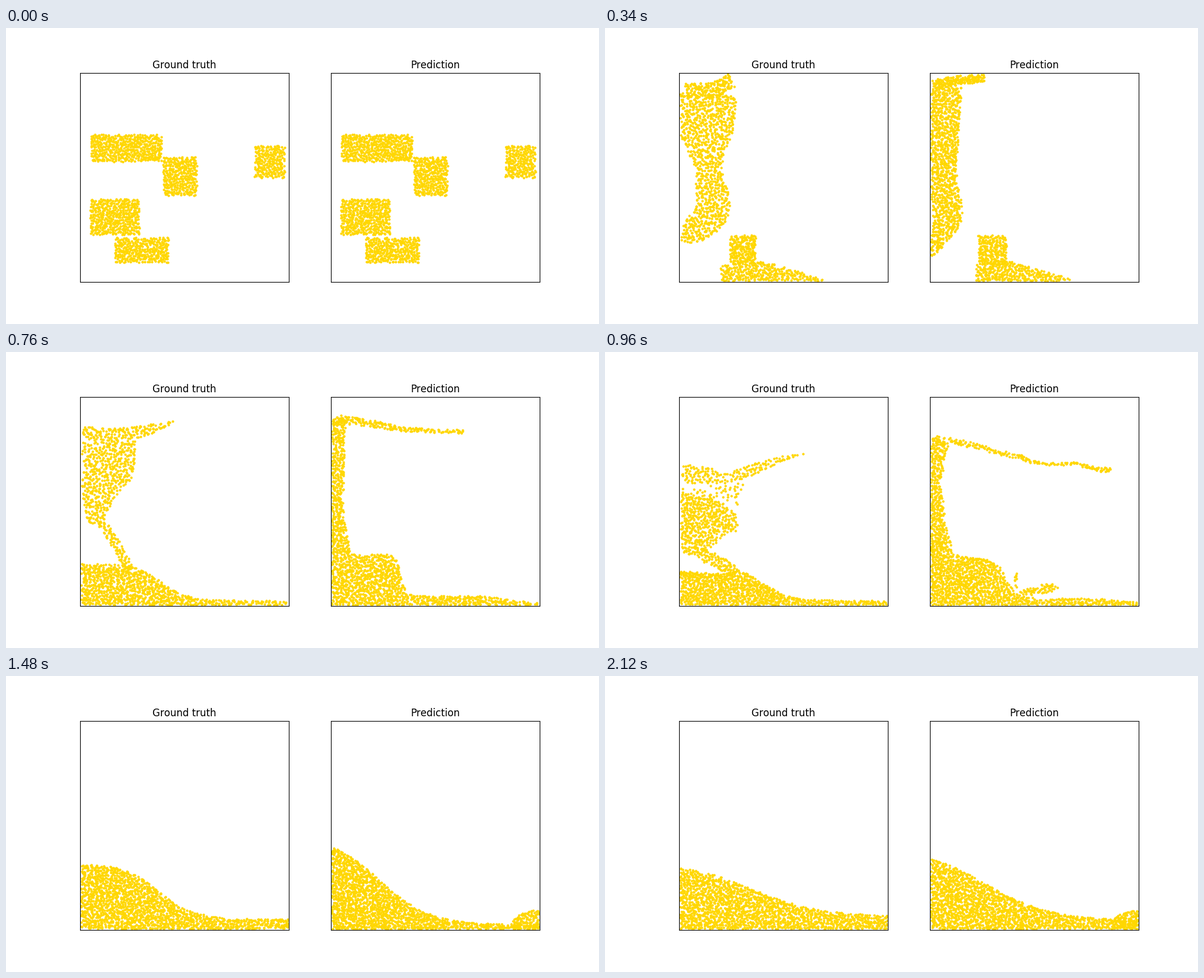
A matplotlib script that plays this animation: 1000x500 px, repeating every 2140 ms.

```python
import numpy as np
import matplotlib.pyplot as plt
from matplotlib.animation import FuncAnimation
from matplotlib.path import Path

plt.rcParams["text.kerning_factor"] = 6
FRAMES, STEP = 107, 20
LEFT, RIGHT, TOP, FLOOR = 126.5, 476, 78, 427.5
TIMES = [0, 4, 9, 17, 26, 38, 58, 74, 106]
N = 1800
CUTS = [180, 1238, 1568]            # crest | bulk | low block | fast block
rng = np.random.default_rng(7)


def spline(t, times, vals):
    """Smooth curve through vals that never overshoots them."""
    times, vals = np.asarray(times), np.asarray(vals, float)
    gaps = np.diff(times).reshape(-1, *[1] * (vals.ndim - 1))
    d = np.diff(vals, axis=0) / gaps
    a, b = d[:-1], d[1:]
    same = a * b > 0
    mid = np.where(same, 2 * a * b / np.where(same, a + b, 1), 0)
    m = np.concatenate([d[:1], mid, d[-1:]])
    k = min(np.searchsorted(times, t, side="right") - 1, len(times) - 2)
    h = times[k + 1] - times[k]
    u = (t - times[k]) / h
    v = 1 - u
    return (vals[k] * (1 + 2 * u) * v * v + m[k] * h * u * v * v
            + vals[k + 1] * u * u * (3 - 2 * u) - m[k + 1] * h * u * u * v)


def rect(x0, y0, x1, y1):
    return np.array([(x0, y0), (x1, y0), (x1, y1), (x0, y1)], float)


def ribbon(*keys):
    """Band along a curve; each key is x, y and width."""
    last = len(keys) - 1
    x, y, w = np.array([spline(u, range(last + 1), keys)
                        for u in np.linspace(0, last, 40)]).T
    dx, dy = np.gradient(x), np.gradient(y)
    side = np.column_stack([-dy, dx]) / (np.hypot(dx, dy)[:, None] + 1e-9)
    mid, side = np.column_stack([x, y]), side * w[:, None] / 2
    band = np.concatenate([mid + side, (mid - side)[::-1]])
    return np.clip(band, [LEFT, TOP], [RIGHT, FLOOR])


def pile(high, low, mid, soft, end=600):
    """Liquid on the floor that slopes from high to low around mid."""
    x = np.linspace(LEFT, min(end, RIGHT), 60)
    h = (high - low) / (1 + np.exp((x - mid) / soft))
    h += low * np.clip((end - x) / 120, .15, 1)
    top = np.column_stack([x, FLOOR - h])
    return np.concatenate([top, [(x[-1], FLOOR), (LEFT, FLOOR)]])


def area(outline):
    x, y = outline.T
    return abs(x @ np.roll(y, 1) - y @ np.roll(x, 1)) / 2


def fill(n, outline, jitter=.45):
    """Scatter n points from a shaken grid inside an outline."""
    lo, hi = outline.min(0), outline.max(0)
    path = Path(outline)
    s = 1.12 * np.sqrt(area(outline) / max(n, 1))
    while True:
        gx, gy = np.meshgrid(np.arange(lo[0], hi[0] + s, s),
                             np.arange(lo[1], hi[1] + s, .87 * s))
        gx[1::2] += s / 2
        grid = np.column_stack([gx.ravel(), gy.ravel()])
        grid += rng.normal(0, jitter * s, grid.shape)
        grid = grid[path.contains_points(grid)]
        if len(grid) >= n:
            return rng.permutation(grid)[:n]
        s *= .985


def cloud(n, parts):
    """Share n points among (density, outline) parts."""
    mass = np.cumsum([density * area(o) for density, o in parts])
    ends = np.round(n * mass / mass[-1]).astype(int)
    counts = np.diff(ends, prepend=0)
    return np.concatenate([fill(c, o) for c, (_, o) in zip(counts, parts)])


def pair(a, b, rounds=2200):
    """Reorder b so that each point has a short way from a."""
    out = np.empty_like(b)
    out[np.argsort(a.sum(1))] = b[np.argsort(b.sum(1))]
    half = len(a) // 2
    for _ in range(rounds):
        p = rng.permutation(len(a))
        i, j = p[:half], p[half:2 * half]
        bad = ((a[i] - a[j]) * (out[i] - out[j])).sum(1) < 0
        i, j = i[bad], j[bad]
        out[i], out[j] = out[j], out[i]
    return out


def track(scenes):
    """Follow every point through the scenes, group by group."""
    poses = [start, start + 4 * drift]
    for groups in scenes:
        cuts = CUTS[:len(groups) - 1]
        counts = np.diff([0, *cuts, N])
        before = np.split(poses[-1], cuts)
        poses.append(np.concatenate(
            [pair(a, cloud(n, g)) for a, n, g in zip(before, counts, groups)]))
    return np.array(poses)


# Blocks with point count and speed in pixels per frame
blocks = [(180, rect(218, 180, 262, 226), (-3.5, -4.5)),
          (303, rect(143, 180, 218, 226), (-3.5, -4.5)),
          (320, rect(265, 218, 322, 283), (-9, -2)),
          (435, rect(142, 289, 225, 349), (-1.5, -1.5)),
          (330, rect(183, 354, 274, 396), (3.3, 3.2)),
          (232, rect(419, 199, 470, 253), (-12.4, 7))]
start = np.concatenate([fill(n, box, .25) for n, box, _ in blocks])
drift = np.concatenate([np.tile(v, (n, 1)) for n, _, v in blocks])

truth = [
    [[(1, ribbon((205, 103, 5), (208, 130, 26), (214, 165, 44), (212, 200, 46)))],
     [(1, ribbon((165, 150, 76), (165, 190, 78), (181, 240, 82),
                 (180, 275, 78), (150, 335, 50), (128, 364, 8)))],
     [(1, ribbon((203, 412, 30), (245, 406, 44), (312, 411, 34))),
      (.15, ribbon((215, 340, 40), (215, 390, 20)))],
     [(1, rect(307, 268, 358, 321))]],

    [[(1, ribbon((135, 105, 22), (175, 105, 26), (214, 88, 24)))],
     [(1, ribbon((172, 112, 100), (170, 165, 94), (174, 240, 46),
                 (182, 300, 58), (150, 342, 45), (128, 360, 8)))],
     [(1, ribbon((195, 414, 26), (250, 410, 34), (368, 425, 4)))],
     [(1, rect(210, 350, 254, 398))]],

    [[(1, ribbon((130, 97, 20), (175, 99, 24), (220, 91, 14)))],
     [(.65, ribbon((168, 105, 88), (166, 150, 78), (157, 205, 60),
                   (168, 250, 30))),
      (.7, ribbon((172, 240, 26), (205, 305, 18), (228, 375, 32))),
      (1, pile(62, 22, 225, 6, 430))]],

    [[(1, ribbon((130, 136, 22), (175, 140, 22), (230, 133, 18), (285, 117, 3)))],
     [(.65, ribbon((172, 150, 90), (173, 190, 88), (158, 230, 64),
                   (148, 290, 22))),
      (.7, ribbon((160, 285, 16), (185, 325, 16), (208, 368, 18))),
      (1, pile(70, 8, 262, 22))]],

    [[(1, ribbon((130, 273, 32), (158, 274, 32), (205, 286, 14),
                 (255, 273, 20), (315, 254, 8), (388, 249, 2)))],
     [(.15, ribbon((130, 303, 14), (190, 305, 25), (240, 315, 40))),
      (1, pile(125, 8, 232, 34))]],

    [[(1, pile(112, 17, 257, 30))]],
    [[(1, pile(112, 22, 250, 55))]],
]

bump = ribbon((432, 419, 14), (456, 412, 27), (476, 411, 33))
guess = [
    [[(1, ribbon((202, 106, 8), (202, 135, 26), (200, 165, 32), (193, 195, 36)))],
     [(1, ribbon((138, 158, 28), (158, 200, 72), (170, 240, 68),
                 (165, 285, 72), (145, 325, 45), (128, 364, 8)))],
     [(1, ribbon((206, 410, 32), (250, 405, 42), (310, 412, 28))),
      (.15, ribbon((205, 300, 20), (210, 345, 45), (218, 388, 20)))],
     [(1, rect(308, 268, 357, 320))]],

    [[(1, ribbon((130, 95, 14), (175, 88, 16), (217, 84, 12)))],
     [(1, ribbon((152, 100, 52), (148, 250, 44), (155, 310, 50),
                 (128, 385, 8)))],
     [(1, ribbon((202, 414, 26), (245, 410, 34), (362, 425, 4)))],
     [(1, rect(206, 350, 254, 399))]],

    [[(1, ribbon((140, 104, 16), (195, 104, 16), (244, 97, 12)))],
     [(1, ribbon((140, 105, 26), (137, 240, 24), (142, 325, 40))),
      (1, pile(106, 22, 205, 14, 415))]],

    [[(1, ribbon((140, 113, 14), (190, 120, 12), (250, 130, 8), (350, 135, 6)))],
     [(1, ribbon((138, 110, 24), (136, 250, 20), (140, 340, 36))),
      (1, pile(86, 16, 243, 4, 500))]],

    [[(1, ribbon((175, 206, 6), (245, 227, 5), (330, 255, 4), (400, 271, 4),
                 (440, 265, 5), (476, 285, 14)))],
     [(1, ribbon((148, 198, 36), (138, 225, 28), (132, 265, 14),
                 (138, 305, 30), (150, 345, 50))),
      (1, pile(88, 8, 248, 24)),
      (1, ribbon((285, 398, 16), (315, 385, 16), (322, 372, 10)))]],

    [[(1, pile(158, 8, 207, 42)), (1, bump)]],
    [[(1, pile(140, 15, 217, 55)), (1, bump)]],
]

fig, axes = plt.subplots(1, 2, figsize=(10, 5), dpi=100)
panels = []
for ax, title, scenes in zip(axes, ["Ground truth", "Prediction"], [truth, guess]):
    ax.set_title(title)
    ax.set_xlim(125, 477.27)
    ax.set_ylim(428.64, 76.37)
    ax.set_aspect(1)
    ax.set_xticks([])
    ax.set_yticks([])
    dots, = ax.plot([], [], "o", ms=2, color="gold")
    panels.append((dots, track(scenes)))


def draw(i):
    for dots, poses in panels:
        dots.set_data(*spline(i, TIMES, poses).T)
    return [dots for dots, _ in panels]


anim = FuncAnimation(fig, draw, frames=FRAMES, interval=STEP,
                     repeat=True, repeat_delay=0)
plt.show()
```
